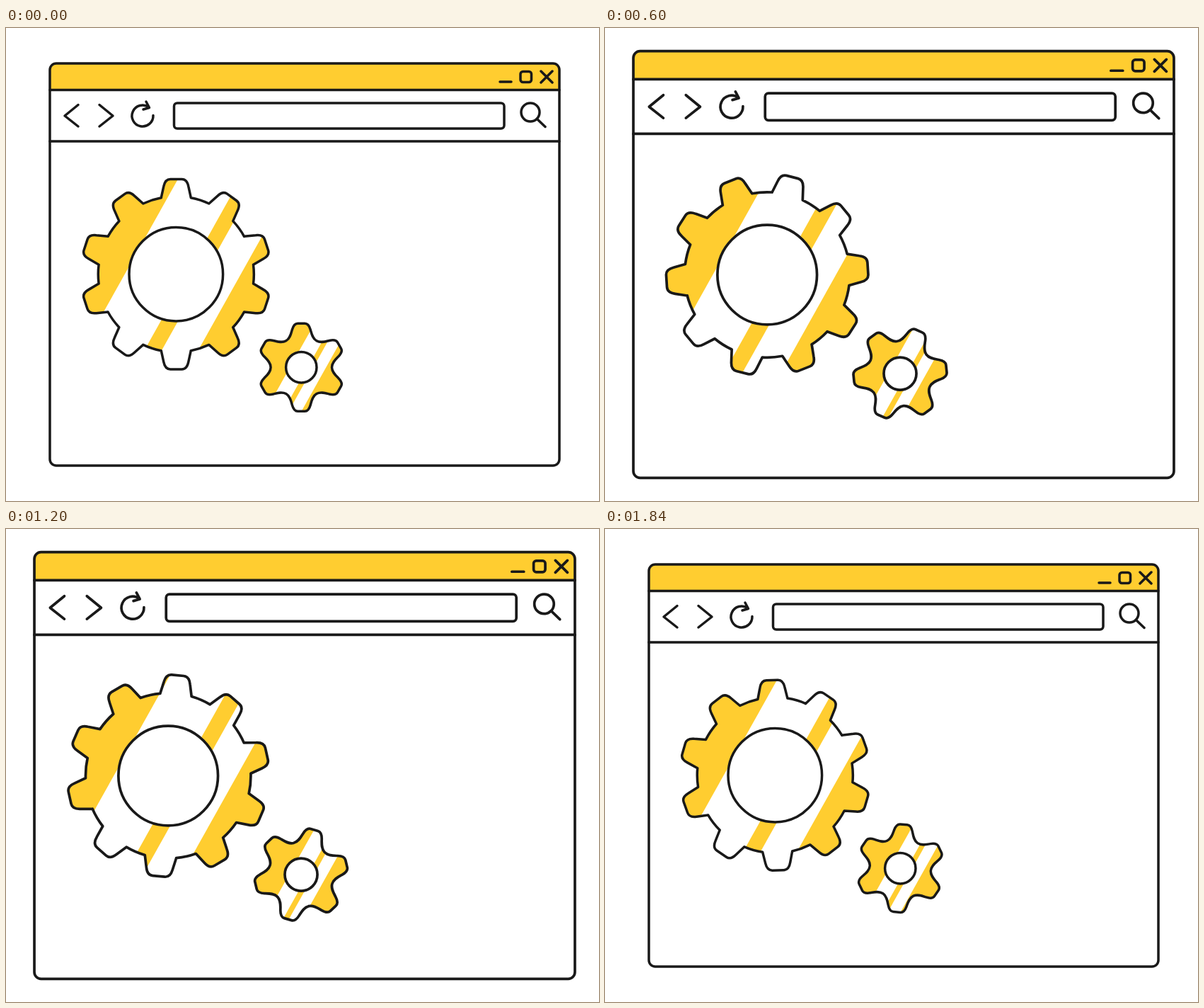
These frames come from a looping animation (838 px wide and 668 px high, 1.88 s). An HTML page:

```html
<!DOCTYPE html>
<html lang="en">
<head>
<meta charset="utf-8">
<title>Browser gears</title>
<style>
  html, body { margin: 0; width: 100%; height: 100%; overflow: hidden; background: #fff; }
  svg { display: block; width: 838px; height: 668px; }
  .line { fill: none; stroke: #191919; stroke-width: 3.5; stroke-linecap: round; stroke-linejoin: round; }
  .white { fill: #fff; }
  .yellow { fill: #ffcd30; }
</style>
</head>
<body>
<svg viewBox="0 0 838 668">
  <g id="scene">
    <path class="yellow" d="M62 87V59a9 9 0 0 1 9-9h702a9 9 0 0 1 9 9v28z"/>
    <g class="line">
      <rect x="62" y="50" width="720" height="568" rx="9"/>
      <path d="M62 87.5H782M62 160H782"/>
      <path d="M698 76H714M756 61l16 16m0-16l-16 16"/>
      <rect x="727" y="61.5" width="15.5" height="15" rx="3.5"/>
      <path d="M102 108.5L83 124l19 15M132 108.5L151 124l-19 15"/>
      <path d="M208 123.5A15 15 0 1 1 202 112M198 104l4.5 8.5L194 115"/>
      <rect x="237.500" y="106" width="466.500" height="36" rx="4.500"/>
      <circle cx="741" cy="119" r="13"/>
      <path d="M750.500 128.500L762 139.500"/>
    </g>
    <g id="big" transform="translate(240.300 347.700)"></g>
    <g id="small" transform="translate(417.300 479.200)"></g>
  </g>
</svg>
<script>
const LOOP = 1880, STEP = 40, SPIN_START = 280, SLOPE = 0.56;
const $ = id => document.getElementById(id);

// Repeats one tooth, given as command letters and x,y pairs, around the centre.
function gearPath(teeth, tooth) {
  let d = '';
  for (let i = 0; i < teeth; i++) {
    const a = i * 2 * Math.PI / teeth, c = Math.cos(a), s = Math.sin(a);
    d += tooth.replace(/(-?[\d.]+),(-?[\d.]+)/g, (_, x, y) =>
      `${(x * c - y * s).toFixed(2)},${(x * s + y * c).toFixed(2)}`);
  }
  return 'M' + d.slice(1) + 'Z';
}

// Stripe between two x positions measured on the gear's horizontal axis.
function stripe([left, right]) {
  const y = 160, k = y * SLOPE;
  return `<path class="yellow" d="M${left + k} ${-y}H${right + k}L${right - k} ${y}H${left - k}Z"/>`;
}

// Only the outline turns; the stripes stay fixed inside it.
function buildGear(id, d, hub, stripes) {
  $(id).innerHTML = `
    <clipPath id="${id}Clip"><path class="turn" d="${d}"/></clipPath>
    <g clip-path="url(#${id}Clip)">${stripes.map(stripe).join('')}</g>
    <path class="line turn" d="${d}"/>
    <circle class="white" r="${hub}"/>
    <circle class="line" r="${hub}"/>`;
  const parts = $(id).querySelectorAll('.turn');
  return angle => parts.forEach(p => p.setAttribute('transform', `rotate(${angle})`));
}

const bigTooth = 'L-21,-108 L-17.5,-124 Q-15.5,-134.3 -8,-134.3 L8,-134.3 ' +
  'Q15.5,-134.3 17.5,-124 L21,-108 Q34.8,-105.3 46.5,-99.7 ';
const smallTooth = 'L-21.6,-37.4 C-16,-40.6 -14.5,-47.5 -13,-53 Q-10.5,-62 -5,-62 ' +
  'L5,-62 Q10.5,-62 13,-53 C14.5,-47.5 16,-40.6 21.6,-37.4 ';

const turnBig = buildGear('big', gearPath(10, bigTooth), 66.3,
  [[-400, -72.5], [15.5, 40], [91.5, 400]]);
const turnSmall = buildGear('small', gearPath(6, smallTooth), 21.7,
  [[-200, -16], [9, 17], [35, 200]]);

const scaleKeys = [[0, 1], [80, 1], [200, 0.972], [320, 1.061],
  [1560, 1.061], [1680, 0.972], [1800, 1], [LOOP, 1]];

function scaleAt(t) {
  const i = scaleKeys.findIndex(k => k[0] > t);
  const [t0, a] = scaleKeys[i - 1], [t1, b] = scaleKeys[i];
  const u = (t - t0) / (t1 - t0);
  return a + (b - a) * u * u * (3 - 2 * u);
}

function draw(t) {
  const spin = Math.max(0, t - SPIN_START) / (LOOP - SPIN_START);
  $('scene').setAttribute('transform',
    `translate(422 334) scale(${scaleAt(t)}) translate(-422 -334)`);
  turnBig(72 * spin);
  turnSmall(-180 * spin);
}

const start = performance.now();
function tick() {
  const t = Math.max(0, performance.now() - start) % LOOP;
  draw(Math.floor(t / STEP) * STEP);
  requestAnimationFrame(tick);
}
tick();
</script>
</body>
</html>
```
